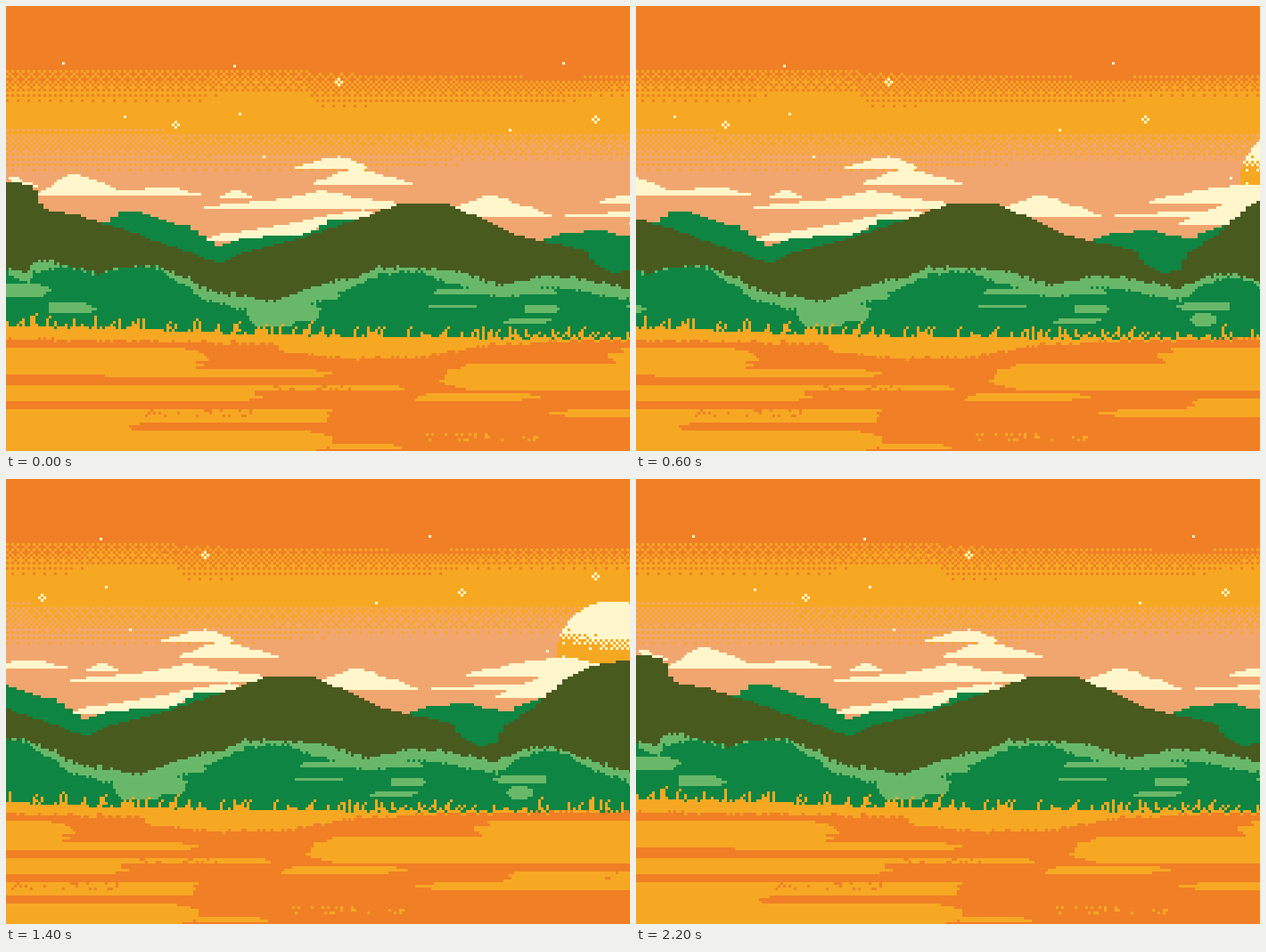
Animation, 700 px wide and 500 px high, one loop 2.4 s. Source, as an HTML page with a canvas:

```html
<!DOCTYPE html>
<html lang="en">
<head>
<meta charset="utf-8">
<title>Sunset hills</title>
<style>
  html, body { margin: 0; width: 100%; height: 100%; overflow: hidden; background: #f07f26; }
  canvas { display: block; }
</style>
</head>
<body>
<canvas id="stage" width="700" height="500"></canvas>
<script>
const CELL = 3, COLS = 294, ROWS = 167, STEP = 200;
const ORANGE = '#f07f26', YELLOW = '#f7a823', PEACH = '#f2a66f', CREAM = '#fff7cb';
const OLIVE = '#495a1f', GREEN = '#0e8542', LIGHT = '#69b869';

const world = document.createElement('canvas');
world.width = COLS;
world.height = ROWS;
const art = world.getContext('2d');

function noise(a, b = 0) {
  const s = Math.sin(a * 127.1 + b * 311.7) * 43758.5453;
  return s - Math.floor(s);
}

// Ordered 4x4 dither threshold for a cell.
function threshold(c, r) {
  const d = c ^ r;
  return (((d & 1) << 3 | (r & 1) << 2 | (d & 2) | (r & 2) >> 1) + 0.5) / 16;
}

function cell(c, r, color, w = 1, h = 1) {
  art.fillStyle = color;
  art.fillRect(c, r, w, h);
}

// Height of a polyline [x, y, x, y, ...] at x.
function heightAt(line, x) {
  let i = 0;
  while (i < line.length - 4 && line[i + 2] < x) i += 2;
  const [x0, y0, x1, y1] = line.slice(i, i + 4);
  return y0 + (y1 - y0) * Math.min(1, Math.max(0, (x - x0) / (x1 - x0)));
}

// Everything below a polyline, in plateaus a few cells wide.
function land(line, color, plateau, rough = 0) {
  for (let c = 0; c < COLS; c++) {
    const x = (Math.floor(c / plateau) + 0.5) * plateau * CELL;
    const top = Math.round((heightAt(line, x) + (noise(c, plateau) - 0.5) * rough) / CELL);
    cell(c, top, color, 1, ROWS - top);
  }
}

// Flat-bottomed cloud that rises to its full height at peak.
function cloud(left, right, peak, base, height) {
  for (let r = Math.round((base - height) / CELL); r < base / CELL; r++) {
    const drop = (base - (r + 0.5) * CELL) / height;
    const inset = Math.max(0, drop) ** 1.3;
    const x0 = left + (peak - left) * inset + (noise(r, left) - 0.5) * 8;
    const x1 = right - (right - peak) * inset + (noise(r, right) - 0.5) * 8;
    const c0 = Math.round(x0 / CELL);
    cell(c0, r, CREAM, Math.max(1, Math.round(x1 / CELL) - c0));
  }
}

// Horizontal bar with ragged, tapering ends.
function streak(color, left, right, middle, height, ragged) {
  const first = Math.round((middle - height / 2) / CELL);
  const count = Math.max(1, Math.round(height / CELL));
  for (let r = first; r < first + count; r++) {
    const off = Math.abs((r + 0.5 - first) / count * 2 - 1) ** 2;
    const c0 = Math.round((left + (off + noise(r, left)) * ragged) / CELL);
    const c1 = Math.round((right - (off + noise(r, right)) * ragged) / CELL);
    cell(c0, r, color, Math.max(0, c1 - c0));
  }
}

function fade(over, under, top, end) {
  for (let c = 0; c < COLS; c++) {
    const y0 = heightAt(top, c * CELL), y1 = heightAt(end, c * CELL);
    for (let r = Math.round(y0 / CELL); r < ROWS; r++) {
      const mix = (r * CELL - y0) / (y1 - y0);
      const density = mix >= 1 ? 1 : 0.28 + 0.62 * mix;
      cell(c, r, density > threshold(c, r) ? under : over);
    }
  }
}

function sky() {
  cell(0, 0, ORANGE, COLS, ROWS);
  fade(ORANGE, YELLOW, [0, 70, 280, 72, 600, 80, 880, 77],
    [0, 108, 220, 106, 240, 99, 335, 99, 345, 112, 620, 108, 680, 99, 880, 102]);
  fade(YELLOW, PEACH, [0, 136, 170, 137, 180, 142, 880, 141],
    [0, 186, 420, 184, 520, 176, 880, 172]);
}

function star(x, y, arm) {
  const c = Math.floor(x / CELL), r = Math.floor(y / CELL);
  for (const side of [-arm, arm]) {
    cell(c + side, r, CREAM);
    cell(c, r + side, CREAM);
  }
}

function stars() {
  for (const [x, y] of [[63, 65], [256, 67], [133, 123], [262, 121], [290, 169], [566, 140],
    [624, 63], [758, 192]]) star(x, y, 0);
  for (const [x, y] of [[374, 84], [191, 133], [662, 128], [810, 110]]) star(x, y, 1);
}

function sun() {
  const cx = 830, cy = 200, radius = 63;
  for (let r = 44; r < 72; r++) {
    for (let c = 254; c < COLS; c++) {
      const x = (c + 0.5) * CELL, y = (r + 0.5) * CELL;
      if (Math.hypot(x - cx, y - cy) > radius) continue;
      const shade = y > 162 ? (y - 176) / 20 + (840 - x) / 150 : 0;
      cell(c, r, shade > threshold(c, r) ? YELLOW : CREAM);
    }
  }
}

function clouds() {
  cloud(0, 34, 8, 203, 12);
  cloud(33, 132, 78, 213, 25);
  cloud(90, 218, 180, 211, 7);
  cloud(320, 412, 372, 183, 14);
  cloud(345, 453, 392, 200, 18);
  cloud(240, 275, 260, 216, 10);
  cloud(221, 462, 370, 227, 15);
  cloud(300, 410, 355, 224, 17);
  cloud(220, 400, 320, 262, 17);
  cloud(310, 450, 400, 248, 19);
  cloud(490, 608, 540, 235, 23);
  cloud(626, 800, 760, 236, 8);
  cloud(668, 850, 775, 220, 21);
  cloud(700, 800, 775, 246, 34);
}

function hills() {
  land([0, 250, 121, 242, 122, 231, 150, 232, 205, 248, 237, 269, 258, 262, 340, 256,
    366, 239, 395, 239, 500, 280, 595, 264, 630, 255, 670, 252, 710, 262, 763, 240], GREEN, 3);
  land([0, 198, 31, 201, 42, 229, 78, 234, 140, 254, 240, 289, 270, 276, 340, 258, 447, 221,
    490, 221, 550, 245, 565, 256, 598, 263, 650, 275, 662, 290, 680, 299, 700, 298, 707, 280,
    740, 258, 780, 222, 810, 209, 880, 198], OLIVE, 2);
}

function forest() {
  const top = [0, 296, 25, 297, 30, 286, 50, 288, 105, 302, 125, 295, 165, 292, 205, 305,
    222, 318, 300, 332, 345, 316, 395, 303, 420, 294, 505, 298, 555, 314, 605, 303, 640, 306,
    700, 318, 725, 305, 755, 300, 780, 308, 845, 328, 880, 333];
  const lightDepth = [0, 3, 25, 15, 70, 0, 160, 0, 200, 12, 300, 17, 345, 18, 400, 9, 460, 2,
    500, 15, 700, 13, 750, 4, 780, 2, 800, 11];
  land(top, LIGHT, 1, 5);
  for (let c = 0; c < COLS; c++) {
    const y = heightAt(top, c * CELL) + heightAt(lightDepth, c * CELL);
    cell(c, Math.round((y + (noise(c, 8) - 0.5) * 4) / CELL), GREEN, 1, ROWS);
  }
  const glade = (...shape) => streak(LIGHT, ...shape, 8);
  glade(-20, 52, 321, 16);
  glade(40, 102, 339, 13);
  glade(265, 358, 345, 17);
  glade(270, 328, 355, 9);
  glade(340, 382, 326, 10);
  glade(470, 534, 338, 4);
  glade(476, 550, 321, 6);
  glade(540, 622, 322, 7);
  glade(575, 626, 340, 9);
  glade(555, 616, 353, 6);
  glade(697, 762, 336, 9);
  glade(710, 744, 353, 16);
  glade(845, 900, 342, 13);
}

function field() {
  const horizon = [0, 360, 140, 362, 200, 365, 330, 370, 520, 373, 880, 373];
  land(horizon, YELLOW, 1, 2);
  for (let c = 0; c < COLS; c++) {
    if (noise(c, 21) > 0.42) continue;
    const base = Math.round(heightAt(horizon, c * CELL) / CELL);
    const blade = 1 + Math.floor(noise(c, 22) * 3.6);
    cell(c, base - blade, YELLOW, 1, blade);
    if (noise(c, 23) > 0.6) cell(c + 1, base - blade - 1, YELLOW);
  }
  land([0, 374, 300, 379, 310, 389, 385, 396, 470, 395, 540, 381, 640, 376, 880, 374],
    ORANGE, 1, 4);
  const furrow = (...shape) => streak(YELLOW, ...shape, 18);
  furrow(-90, 230, 399, 31);
  furrow(100, 372, 411, 9);
  furrow(-90, 295, 434, 17);
  furrow(200, 452, 428, 6);
  furrow(-90, 378, 460, 15);
  furrow(-90, 160, 480, 50);
  furrow(-90, 370, 491, 26);
  furrow(485, 970, 417, 29);
  furrow(670, 970, 395, 24);
  furrow(445, 600, 438, 9);
  furrow(605, 970, 457, 8);
  furrow(700, 970, 450, 19);
  furrow(350, 450, 494, 7);
  streak(ORANGE, 133, 410, 475, 6, 8);
  // Loose specks along the furrows.
  for (const [x, y, width, color] of [
    [150, 453, 130, ORANGE], [300, 425, 90, ORANGE], [470, 480, 130, YELLOW], [820, 440, 60, ORANGE]
  ]) {
    for (let i = 0; i < width / 6; i++) {
      cell(Math.floor((x + noise(i, x) * width) / CELL), Math.floor((y + noise(i, y) * 9) / CELL), color);
    }
  }
}

for (const paint of [sky, sun, clouds, stars, hills, forest, field]) paint();

const stage = document.getElementById('stage').getContext('2d');
stage.imageSmoothingEnabled = false;
const PAN = [0, 30, 60, 90, 150, 180];

function frame(now) {
  const step = Math.floor(now / STEP) % (PAN.length * 2);
  const pan = PAN[Math.min(step, PAN.length * 2 - 1 - step)];
  stage.drawImage(world, -pan, 0, COLS * CELL, ROWS * CELL);
  requestAnimationFrame(frame);
}
requestAnimationFrame(frame);
</script>
</body>
</html>
```
